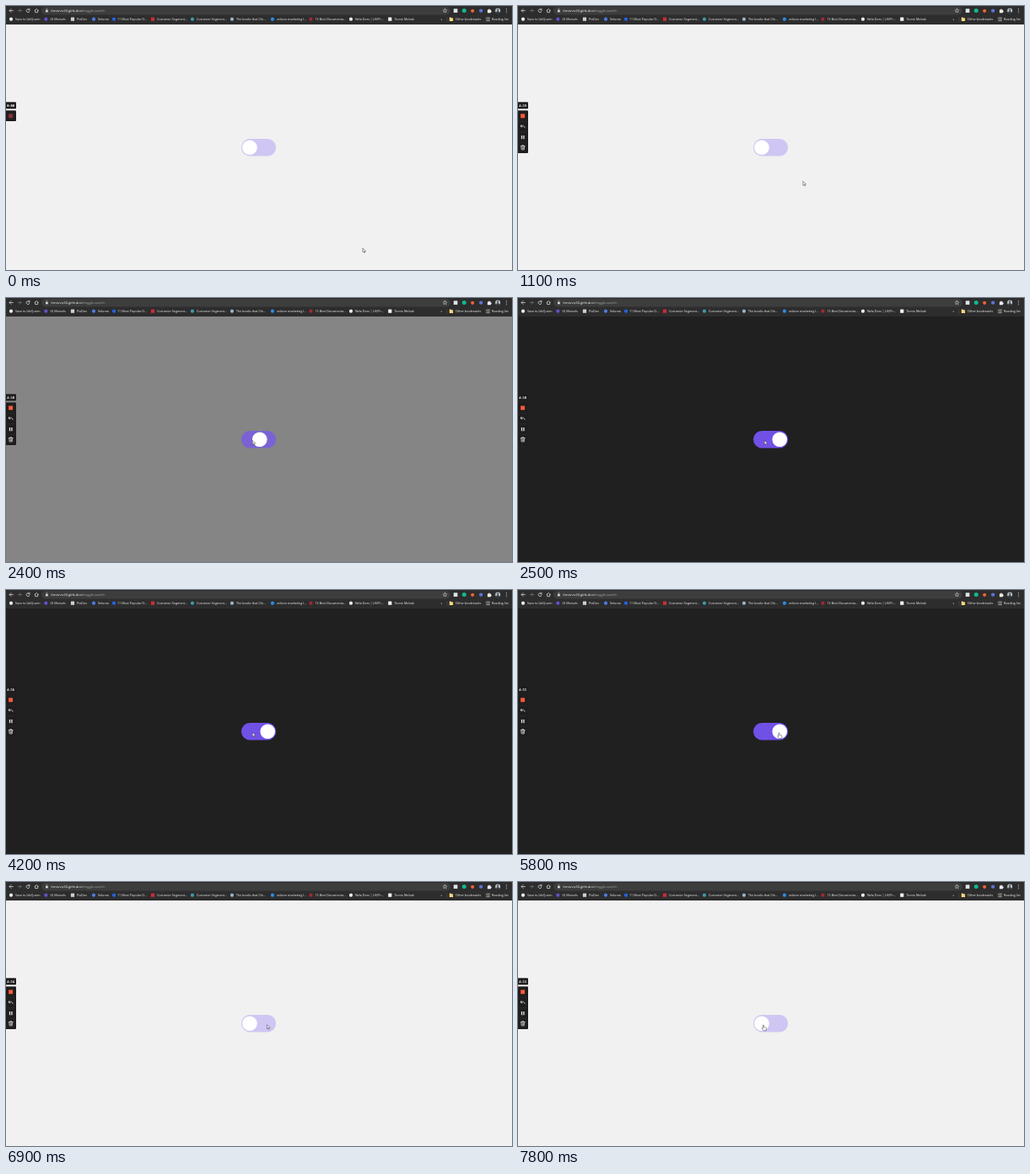
These frames come from a looping animation (600 by 314 pixels, 8000 ms). An HTML page:

```html
<!DOCTYPE html>
<html lang="en">
<head>
<meta charset="utf-8">
<title>Toggle switch</title>
<style>
  html, body { margin: 0; width: 100%; height: 100%; overflow: hidden; background: #f1f1f1; }
  svg { display: block; width: 100%; height: 100%; }
  text { font-family: "Open Sans", "Noto Sans", sans-serif; font-size: 3.7px; font-weight: 500; fill: #f4f4f4; white-space: pre; }
  .url { font-size: 4.1px; }
  .dim { fill: #a2a2a2; }
  .timer { font-family: "Noto Sans Mono", "DejaVu Sans Mono", monospace; font-weight: 800; fill: #fff; text-anchor: middle; }
  .line { fill: none; stroke: #e6e6e6; stroke-width: .7; stroke-linecap: round; stroke-linejoin: round; }
  .faint { stroke: #77797d; }
  .cursor { fill: #fff; stroke: #333; stroke-width: .5; stroke-linejoin: round; }
</style>
</head>
<body>
<svg viewBox="0 0 600 314">
  <rect id="page" width="600" height="314"/>

  <g id="toggle">
    <rect id="track" x="279" y="158.1" width="41.2" height="20.3" rx="10.15"/>
    <circle id="knob" cy="168.3" r="8.8" fill="#fff"/>
  </g>

  <g id="browser">
    <rect width="600" height="22" fill="#2d2d2e"/>
    <rect x="42" y="1" width="485" height="9.4" rx="4.7" fill="#3d3d3e"/>
    <path class="line" d="M8.3 5.5H4.2M6 3.6 4.1 5.5 6 7.4"/>
    <path class="line faint" d="M14 5.5h4.1M16.3 3.6l1.9 1.9-1.9 1.9"/>
    <path class="line" d="M27.7 4.4A2 2 0 1 0 28 6.1M28 3.2v1.5h-1.5"/>
    <path class="line" d="M34 5.4 36.2 3.4 38.4 5.4M34.7 5v2.6h3V5"/>
    <rect x="47" y="5" width="2.8" height="2.3" fill="#d4d4d4"/>
    <path class="line" style="stroke-width:.5" d="M47.6 5V4.3a.8.8 0 0 1 1.6 0V5"/>
    <text class="url" x="53.5" y="7">kmorvu34.github.io<tspan class="dim">/toggle-switch</tspan></text>
    <path class="line" style="stroke-width:.5" d="M520.5 3.2l.7 1.5 1.6.2-1.2 1.1.3 1.6-1.4-.8-1.4.8.3-1.6-1.2-1.1 1.6-.2z"/>
    <rect x="530.8" y="3.3" width="4.6" height="4.6" fill="#dfe4e8"/>
    <circle cx="543.3" cy="5.6" r="2.5" fill="#16b888"/>
    <circle cx="553.2" cy="5.8" r="2.1" fill="#ef6031"/>
    <circle cx="563.2" cy="5.6" r="2.2" fill="#5c74d6"/>
    <path d="M570.9 4.4h1.2a.9.9 0 0 1 1.8 0h1.1v1.2a.8.8 0 0 1 0 1.6v1h-4.1z" fill="#e6e7e9"/>
    <circle cx="583.2" cy="5.6" r="3" fill="#bcc5cb"/>
    <path d="M581 7.7a2.3 2.3 0 0 1 4.4 0 3 3 0 0 1-4.4 0M582.1 4.6a1.1 1.1 0 1 0 2.2 0 1.1 1.1 0 0 0-2.2 0" fill="#33383d"/>
    <path d="M593.4 3.5v.1m0 2v.1m0 2v.1" class="line" style="stroke-width:.9"/>
    <g id="bookmarks"></g>
    <text x="515.5" y="17">»</text>
    <path d="M523 13v6" stroke="#55575b" stroke-width=".5"/>
    <path d="M525.8 13.5h1.7l.6.7h2v3.9h-4.3z" fill="#f5d77b"/>
    <text x="533" y="17">Other bookmarks</text>
    <path class="line" style="stroke-width:.6" d="M569.3 14h.1m1.1 0h3m-4.2 1.8h.1m1.1 0h3m-4.2 1.8h.1m1.1 0h3"/>
    <text x="576" y="17">Reading list</text>
  </g>

  <g id="recorder">
    <path d="M0 114.2h11a1 1 0 0 1 1 1v6a1 1 0 0 1-1 1H0z" fill="#1e1e1e"/>
    <text class="timer" id="timer" x="5.6" y="119.5"></text>
    <rect id="panel" x="-2" y="124.2" width="14" rx="1" fill="#1e1e1e"/>
    <rect id="stop" x="3.1" y="128.2" width="5" height="5" rx=".6"/>
    <g id="tools">
      <path d="M1.5 137.2h9M1.5 149.8h9M1.5 162.2h9" stroke="#343434" stroke-width=".5"/>
      <path class="line" d="M3.8 141.5 3.2 143.5 5.3 143.8M3.4 143.3C5 141.4 7.6 141.9 8 144.7"/>
      <path class="line" style="stroke-width:1.3;stroke-linecap:butt" d="M4.5 153.9v4.3M6.9 153.9v4.3"/>
      <path class="line" d="M3.2 166.7h5M4.9 166.5v-.9h1.7v.9M3.8 166.9l.3 4h3.2l.3-4M5.2 168v1.7M6.3 168v1.7"/>
    </g>
  </g>

  <g id="pointer">
    <path id="arrow" class="cursor" d="M0 0v4.8l1.1-1 .8 1.8.9-.4-.8-1.7h1.5z"/>
    <path id="hand" class="cursor" d="M-.6.6a.6.6 0 0 1 1.2 0v2.1l2.4.6q.6.2.5.9l-.4 2.6h-3L-1.8 4.4q0-.9.7-.6l.5.5z"/>
  </g>
</svg>

<script>
const LOOP = 8000, STEP = 100;
const $ = id => document.getElementById(id);
const set = (id, attrs) => {
  for (const name in attrs) $(id).setAttribute(name, attrs[name]);
};
const show = (id, on) => set(id, { visibility: on ? "visible" : "hidden" });

// icon x, icon colour, label x, label, square icon
const bookmarks = [
  [6, "#eceded", 11, "Save to LibQuern"],
  [47.3, "#6650cf", 52.5, "UI Morsels"],
  [79, "#cfd1d4", 84, "PixDov", true],
  [104, "#4d7be0", 109, "Velumo"],
  [128, "#2860e8", 132, "11 Most Popular O..."],
  [174, "#d12b36", 179, "Customer Segment...", true],
  [221, "#3c9aa8", 226, "Customer Segment..."],
  [268, "#9db2c2", 273, "The books that Chi..."],
  [316, "#2d8de8", 321, "zelvion marketing (..."],
  [361.5, "#a52832", 366.5, "13 Best Documenta..."],
  [409, "#e9eaec", 414, "Nela Dorv | UX/Pr..."],
  [455.3, "#f3f3f3", 460.5, "Torvin Melzak", true]
];
$("bookmarks").innerHTML = bookmarks.map(([x, color, textX, label, square]) =>
  `<rect x="${x - 2.1}" y="13.6" width="4.2" height="4.2" rx="${square ? .3 : 2.1}" fill="${color}"/>` +
  `<text x="${textX}" y="17">${label}</text>`).join("");

// time, page, track, knob x
const looks = [
  [0, "#f1f1f1", "#d0c6f4", 289],
  [2300, "#f1f1f1", "#c9bdf1", 289.4],
  [2400, "#858585", "#7a62d4", 300.8],
  [2500, "#202020", "#7150e6", 310.3],
  [5900, "#f1f1f1", "#d0c6f4", 289]
];

// time, x, y of the pointer tip
const path = [
  [0, 423, 288], [200, 423, 288], [900, 352, 221], [1700, 296, 171],
  [2000, 296, 171], [2200, 292.3, 169.4], [4400, 292.3, 169.4],
  [4800, 309.5, 169.8], [7500, 309.5, 169.8], [7800, 291, 170], [LOOP, 291, 170]
];

function pointerAt(t) {
  const i = path.findIndex(point => point[0] > t);
  const [t0, x0, y0] = path[i - 1], [t1, x1, y1] = path[i];
  const k = (t - t0) / (t1 - t0);
  return [x0 + (x1 - x0) * k, y0 + (y1 - y0) * k];
}

function timerText(t) {
  if (t < 300) return "0:00";
  const left = 300 - Math.floor(t / 1000);
  return Math.floor(left / 60) + ":" + String(left % 60).padStart(2, "0");
}

function render(t) {
  const [, page, track, knobX] = looks.filter(look => look[0] <= t).pop();
  set("page", { fill: page });
  set("track", { fill: track });
  set("knob", { cx: knobX });

  const recording = t >= 300;
  $("timer").textContent = timerText(t);
  set("panel", { height: recording ? 50.8 : 12.8 });
  set("stop", { fill: recording ? "#f7583b" : "#87303b" });
  show("tools", recording);

  // The pointer is a hand over the knob and an arrow elsewhere.
  const [x, y] = pointerAt(t);
  const hand = Math.hypot(x - knobX, y - 168.3) < 8;
  set("pointer", { transform: `translate(${x} ${y})` });
  show("hand", hand);
  show("arrow", !hand);
}

function tick() {
  const t = performance.now() % LOOP;
  render(Math.floor(t / STEP) * STEP);
  requestAnimationFrame(tick);
}
tick();
</script>
</body>
</html>
```
